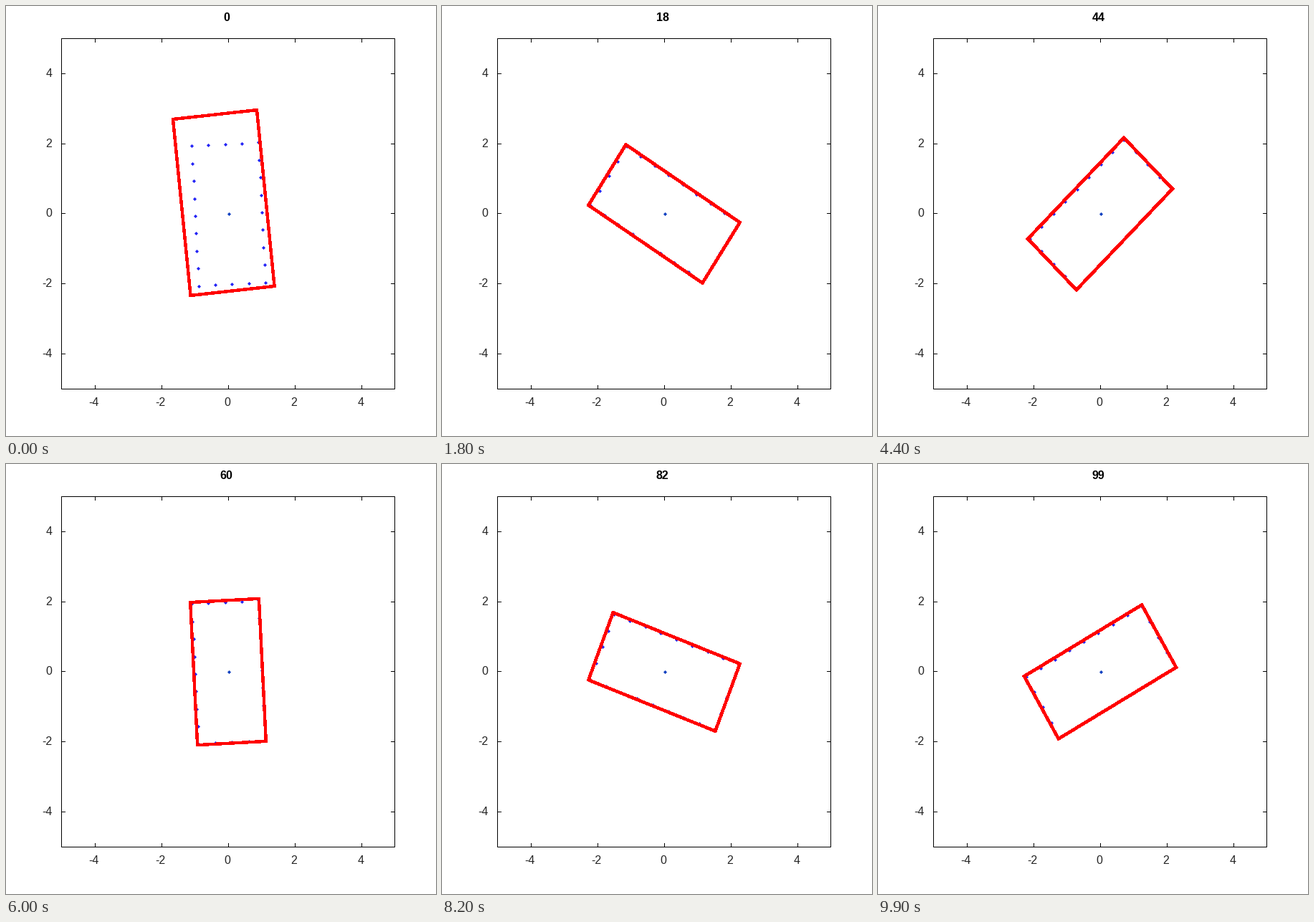
A matplotlib script for the animation above (10 s loop, 600x600 px).

```python
import numpy as np
import matplotlib.pyplot as plt
from matplotlib.animation import FuncAnimation
from matplotlib.patches import Polygon, Rectangle

SIZE, DPI, FRAMES = 600, 100, 100
PX = 72 / DPI                       # one pixel in points
LEFT, RIGHT, TOP, BOTTOM = 77.5, 542.5, 45.5, 534.5
CENTER = np.array([310.0, 290.0])
SCALE = np.array([46.5, -48.9])     # pixels per data unit
STEP = np.radians(3)
DECAY = 0.7
TICK = 5.5

plt.rcParams["font.family"] = "Liberation Sans"


def to_px(points):
    return CENTER + np.asarray(points) * SCALE


def pixel_centers(points):
    x, y = to_px(points).T.round(6)
    return np.floor(x) + 0.5, np.ceil(y) - 0.5


def rotate(points, angle):
    c, s = np.cos(angle), np.sin(angle)
    return np.asarray(points) @ np.array([[c, s], [-s, c]])


def outline_points():
    """Points every half unit around a 2 x 4 rectangle."""
    xs, ys = np.linspace(-1, 1, 5), np.linspace(-2, 2, 9)
    return np.array([(x, y) for x in xs for y in ys
                     if abs(x) == 1 or abs(y) == 2])


fig = plt.figure(figsize=(SIZE / DPI, SIZE / DPI), dpi=DPI, facecolor="white")
ax = fig.add_axes([0, 0, 1, 1])
ax.set(xlim=(0, SIZE), ylim=(SIZE, 0))
ax.axis("off")


def line(x, y):
    ax.plot(x, y, color="black", lw=PX, solid_capstyle="butt", snap=False)


def label(x, baseline, text, ha, **style):
    # the small lift keeps whole-pixel baselines from rounding down
    return ax.text(x, baseline - 0.3, text, ha=ha, va="baseline",
                   fontsize=16 * PX, **style)


ax.add_patch(Rectangle((LEFT, TOP), RIGHT - LEFT, BOTTOM - TOP,
                       fill=False, ec="black", lw=PX, snap=False))
for v in (-4, -2, 0, 2, 4):
    x, y = pixel_centers((v, v))
    line([x, x], [TOP, TOP + TICK])
    line([x, x], [BOTTOM, BOTTOM - TICK])
    line([LEFT, LEFT + TICK], [y, y])
    line([RIGHT, RIGHT - TICK], [y, y])
    label(x - 1.8, 558, str(v), "center", color="#262626")
    label(64.5, y + 4.5, str(v), "right", color="#262626")

title = label(307.5, 21, "0", "center", color="black", weight="bold")

BODY = outline_points()
BOX = np.array([(-1, 1), (1, 1), (1, -1), (-1, -1)])

dot_style = dict(ls="", marker="D", ms=3.6 * PX, mew=0, snap=False, zorder=3)
dots, = ax.plot([], [], color="#2222f5", **dot_style)
hub_x, hub_y = pixel_centers((0, 0))
ax.plot([hub_x], [hub_y], color="#1040c0", **dot_style)
box = Polygon(to_px(BOX), fill=False, ec="red", lw=3.4 * PX,
              antialiased=False, snap=False, zorder=4)
ax.add_patch(box)


def update(n):
    angle = STEP * (n + 1)
    error = DECAY ** n              # the estimate settles onto the body
    half = np.array([1.03, 2.038]) + error * np.array([0.235, 0.49])
    offset = error * np.array([-0.134, 0.317])

    dots.set_data(*pixel_centers(rotate(BODY, angle)))
    box.set_xy(to_px(rotate(BOX * half, angle + STEP * error) + offset))
    title.set_text(str(n))
    return dots, box, title


anim = FuncAnimation(fig, update, frames=FRAMES, interval=100,
                     repeat=True, repeat_delay=0, blit=False)
plt.show()
```
